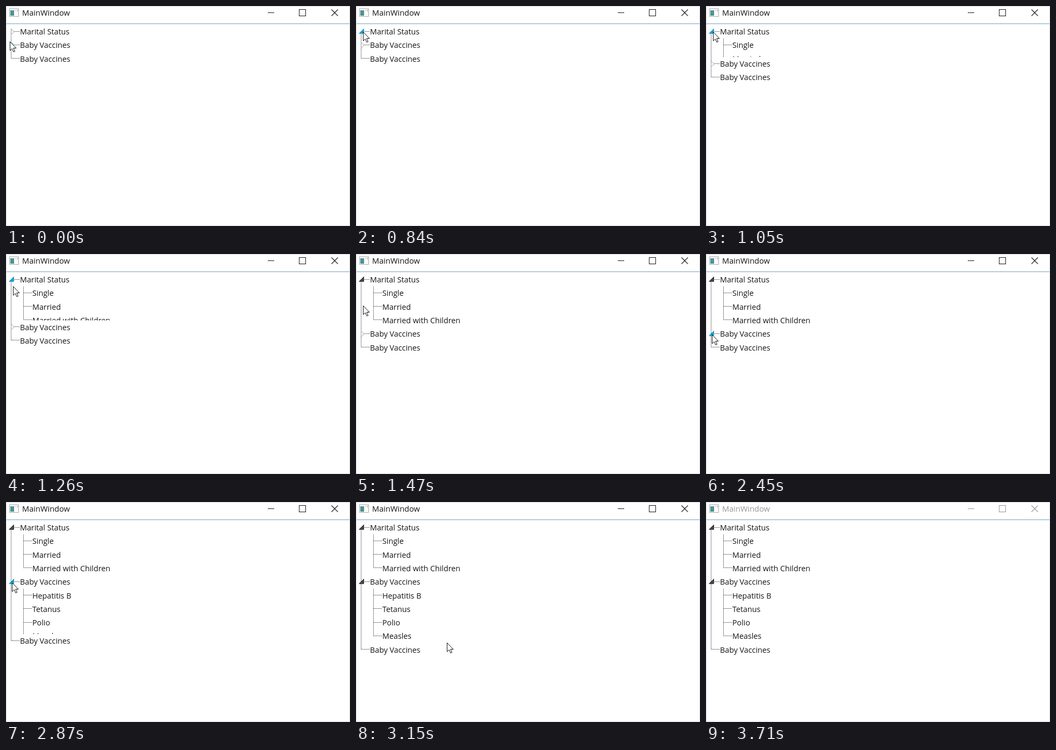
Write an HTML page with a canvas that moves like this. It is 640 px wide and 410 px high and loops after 4.34 s.

```html
<!DOCTYPE html>
<html lang="en">
<head>
<meta charset="utf-8">
<title>MainWindow</title>
<style>
  html, body { margin: 0; width: 100%; height: 100%; overflow: hidden; background: #fff; }
  canvas { display: block; }
</style>
</head>
<body>
<canvas id="stage" width="640" height="410"></canvas>
<script>
const ctx = document.getElementById('stage').getContext('2d');
const LOOP = 4340, STEP = 70, ROW = 25.3, FIRST_TOP = 35;
const FONT = '"Open Sans", "Noto Sans", sans-serif';

const tree = [
  { label: 'Marital Status', opensAt: 840, children: ['Single', 'Married', 'Married with Children'] },
  { label: 'Baby Vaccines', opensAt: 2450, children: ['Hepatitis B', 'Tetanus', 'Polio', 'Measles'] },
  { label: 'Baby Vaccines' }
];

// Pointer path: [time, x, y]
const pointerPath = [
  [0, 8, 66], [280, 14, 48], [1120, 14, 48], [1260, 14, 60], [1820, 14, 157],
  [2030, 14, 157], [2240, 12, 150], [3010, 12, 150], [3080, 40, 170],
  [3150, 170, 262], [3220, 399, 400], [3290, 700, 600]
];

function pointerAt(t) {
  const next = pointerPath.findIndex(key => key[0] > t);
  if (next < 0) return { x: 700, y: 600 };
  const [t0, x0, y0] = pointerPath[next - 1], [t1, x1, y1] = pointerPath[next];
  const k = (t - t0) / (t1 - t0);
  return { x: Math.round(x0 + (x1 - x0) * k), y: Math.round(y0 + (y1 - y0) * k) };
}

function openness(t, start) {
  const k = Math.min(1, Math.max(0, (t - start) / 560));
  return 1 - (1 - k) ** 1.3;
}

function polygon(points, fill, stroke, width = 1) {
  ctx.beginPath();
  points.forEach(([x, y]) => ctx.lineTo(x, y));
  ctx.closePath();
  ctx.fillStyle = fill;
  ctx.fill();
  ctx.strokeStyle = stroke;
  ctx.lineWidth = width;
  ctx.stroke();
}

function line(x0, y0, x1, y1, color, width = 1, dash = []) {
  ctx.setLineDash(dash);
  ctx.strokeStyle = color;
  ctx.lineWidth = width;
  ctx.beginPath();
  ctx.moveTo(x0, y0);
  ctx.lineTo(x1, y1);
  ctx.stroke();
  ctx.setLineDash([]);
}

const dotted = (x0, y0, x1, y1) => line(x0, y0, x1, y1, '#222', 1, [1, 1]);
const connectorY = top => Math.floor(top + 12) + 0.5;

function text(label, x, baseline, size = 14.3, color = '#161616') {
  ctx.font = `${size}px ${FONT}`;
  ctx.fillStyle = color;
  ctx.fillText(label, x, baseline);
}

function rowText(label, x, top) {
  text(label, x, Math.round(top + 18));
}

function arrow(top, open, hover) {
  const y = Math.round(top + 0.5);
  if (open) {
    polygon([[5.8, y + 15.2], [14.4, y + 15.2], [14.4, y + 6.6]],
      hover ? '#1ba0cd' : '#484848', hover ? '#1b97c2' : '#262626');
  } else {
    polygon([[9.5, y + 6.5], [15, y + 12], [9.5, y + 17.5]], '#fff', hover ? '#27b9ec' : '#989898');
  }
}

function childRows(children, top, height) {
  ctx.save();
  ctx.beginPath();
  ctx.rect(0, top, 640, height);
  ctx.clip();
  dotted(32.5, Math.floor(top), 32.5, connectorY(top + (children.length - 1) * ROW));
  children.forEach((label, i) => {
    const y = top + i * ROW;
    dotted(33, connectorY(y), 49, connectorY(y));
    rowText(label, 49, y);
  });
  ctx.restore();
}

function drawTree(t, pointer) {
  let top = FIRST_TOP;
  const rows = tree.map(node => {
    const height = node.children ? node.children.length * ROW * openness(t, node.opensAt) : 0;
    const row = { ...node, top, height };
    top += ROW + height;
    return row;
  });
  dotted(9.5, Math.floor(connectorY(FIRST_TOP)), 9.5, connectorY(rows[2].top));
  for (const row of rows) {
    const y = connectorY(row.top);
    dotted(row.children ? 16 : 10, y, 26, y);
    rowText(row.label, 26, row.top);
    if (!row.children) continue;
    if (row.height) childRows(row.children, row.top + ROW, row.height);
    const hover = pointer.x < 20 && pointer.y >= row.top && pointer.y < row.top + ROW;
    arrow(row.top, t >= row.opensAt, hover);
  }
}

function drawWindow(t) {
  const color = t < 3640 ? '#151515' : t < 3710 ? '#555' : '#969696';
  ctx.fillStyle = '#fff';
  ctx.fillRect(0, 0, 640, 410);
  ctx.strokeStyle = '#d9dade';
  ctx.lineWidth = 1;
  ctx.strokeRect(0.5, 0.5, 639, 409);
  line(1, 33, 639, 33, '#b4cddb', 2);

  polygon([[6.5, 5], [23.5, 5], [23.5, 19.5], [6.5, 19.5]], '#fafafa', '#a5a9ab');
  const teal = ctx.createLinearGradient(8, 8, 15, 18);
  teal.addColorStop(0, '#5d8fb0');
  teal.addColorStop(1, '#3f9a78');
  ctx.fillStyle = teal;
  ctx.fillRect(8, 8, 7, 10);
  line(17, 8.5, 19, 8.5, '#b5b5b5');
  line(21.5, 7, 21.5, 10, '#8a8a8a');

  text('MainWindow', 30, 18, 14.6, color);
  line(487, 12.5, 499, 12.5, color);
  ctx.strokeRect(545.5, 6.5, 12, 12);
  line(605.5, 6.5, 617.5, 18.5, color, 1.1);
  line(617.5, 6.5, 605.5, 18.5, color, 1.1);
}

function drawPointer({ x, y }) {
  const shape = [[0, 0], [0, 16.5], [3.8, 13], [6.5, 19], [9, 18], [6.4, 12], [11.5, 12]];
  polygon(shape.map(([dx, dy]) => [x + dx - 0.5, y + dy + 0.5]), '#fff', '#111');
}

function draw(now) {
  const t = Math.floor((now % LOOP) / STEP) * STEP;
  const pointer = pointerAt(t);
  drawWindow(t);
  drawTree(t, pointer);
  drawPointer(pointer);
}

const start = performance.now();
function tick() {
  draw(performance.now() - start);
  requestAnimationFrame(tick);
}
tick();
</script>
</body>
</html>
```
